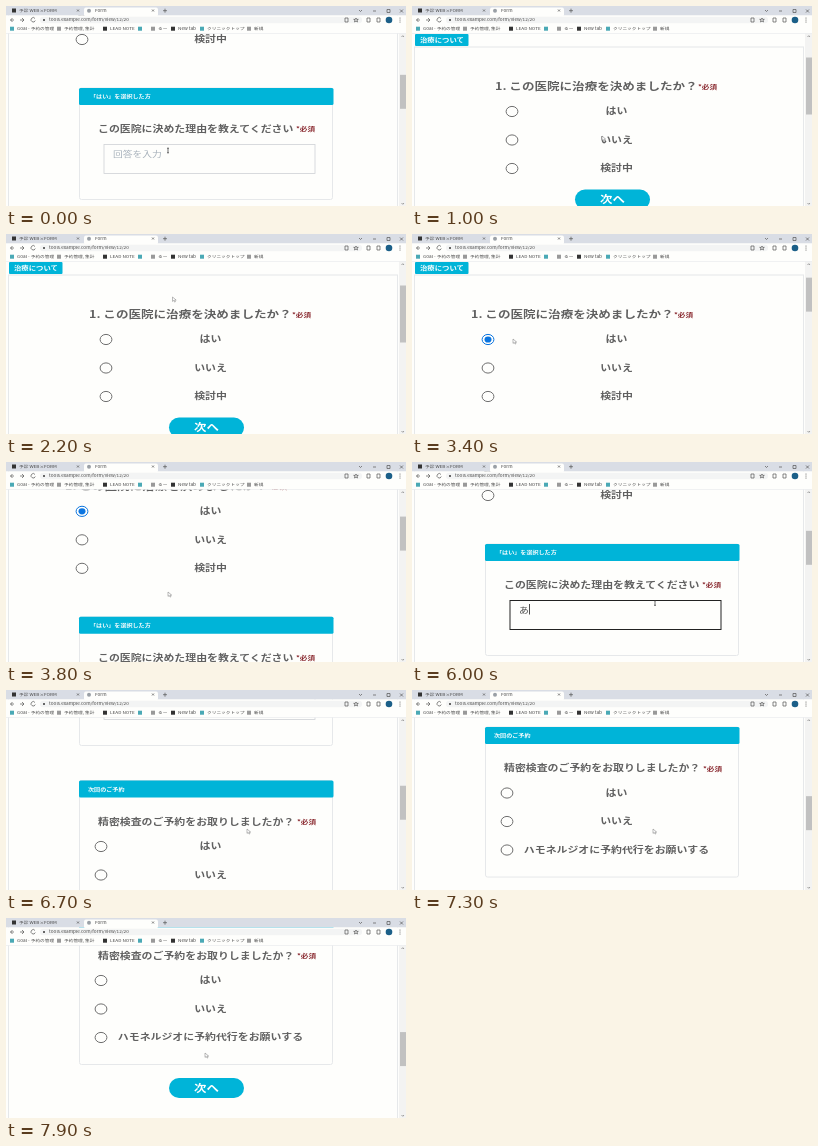
An HTML page that plays this animation: 400 by 200 pixels, repeating every 8 s.

```html
<!DOCTYPE html>
<html lang="ja">
<head>
<meta charset="utf-8">
<title>アンケート</title>
<style>
html, body { margin: 0; width: 100%; height: 100%; overflow: hidden; background: #fefefc; }
svg { display: block; width: 400px; height: 200px; }
text { font-family: "Noto Sans CJK JP", "Noto Sans CJK", "Noto Sans", sans-serif; white-space: pre; }
</style>
</head>
<body>
<svg id="stage" viewBox="0 0 400 200"></svg>
<script>
const CYAN = '#00b4d8', INK = '#606060', LINE = '#e6e8ea', PAPER = '#fefefc', BLUE = '#0b75e0';
const ASPECT = 1.27;
const ROW = 28.5;    // distance between answers
const $ = id => document.getElementById(id);

// y is the vertical middle of the line
const text = (x, y, size, str, fill = INK, weight = 700, anchor = 'start') =>
  `<text transform="translate(${x} ${y + size * .37}) scale(${ASPECT} 1)" font-size="${size}"
    font-weight="${weight}" fill="${fill}" text-anchor="${anchor}">${str}</text>`;
const rect = (x, y, w, h, fill, extra = '') =>
  `<rect x="${x}" y="${y}" width="${w}" height="${h}" fill="${fill}" ${extra}/>`;
const path = (d, color = '#555', width = .7) =>
  `<path d="${d}" fill="none" stroke="${color}" stroke-width="${width}"/>`;
const dot = (x, y, r, fill) => `<circle cx="${x}" cy="${y}" r="${r}" fill="${fill}"/>`;

const question = (x, y, size, str, end) =>
  text(x, y, size, str) + text(end, y + .7, 6, '*必須', '#8a2a30');
const options = (y, name, labels) => labels.map((s, i) =>
  `<ellipse id="${name}${i}" cx="95" cy="${y + ROW * i}" rx="5.9" ry="5.1" fill="${PAPER}" stroke="#707070"/>` +
  text(204.5, y + ROW * i - .5, 8.6, s, INK, 700, 'middle')).join('');
const button = y =>
  rect(163, y - 10, 75, 20, CYAN, 'rx="10"') + text(200.5, y, 9.8, '次へ', '#fff', 700, 'middle');
const card = (y, h, x, title) =>
  rect(73.5, y, 253, h, PAPER, `stroke="${LINE}" rx="2"`) +
  rect(73, y, 254.5, 17, CYAN, 'rx="1.5"') + text(x, y + 8.5, 4.8, title, '#fff');

const page =
  rect(2.5, 98, 389, 900, PAPER, `stroke="${LINE}"`) +
  rect(3, 85, 53.5, 12, CYAN, 'rx="1"') + text(8, 91, 5.8, '治療について', '#fff') +
  `<g id="heading">${question(83, 137, 9.9, '1. この医院に治療を決めましたか？', 286)}</g>` +
  options(162.5, 'radio', ['はい', 'いいえ', '検討中']) +
  `<ellipse id="pick" cx="76" cy="162.5" rx="3.5" ry="3.1" fill="${BLUE}"/>` +
  `<g id="short">${button(250.5)}</g>` +
  `<g id="long">` +
  card(268, 111.5, 84, '「はい」を選択した方') +
  question(92, 308.5, 8.6, 'この医院に決めた理由を教えてください', 290) +
  rect(98, 324.5, 211, 29, PAPER, 'id="box"') +
  text(107, 334, 7.7, '<tspan id="answer"></tspan>', '#a6b0ba', 400) +
  rect(117, 328, .8, 10.5, '#222', 'id="caret"') +
  card(414.5, 150, 82, '次回のご予約') +
  question(92, 455.5, 8.6, '精密検査のご予約をお取りしましたか？', 291) +
  options(480.5, 'visit', ['はい', 'いいえ', 'ハモネルジオに予約代行をお願いする']) +
  button(588) + `</g>`;

const bookmarks = {
  4: 'Goal - 予約の管理', 51: '予約管理, 集計', 97: 'LEAD NOTE', 132: '', 145: 'るー',
  165: 'New tab', 194: 'クリニックトップ', 241: '新規'
};
const small = (x, y, s) => text(x, y, 3.7, s, '#444', 400);
const chrome =
  rect(0, 0, 400, 9.5, '#d9dde5') + rect(0, 9.5, 400, 18, PAPER) +
  rect(78, 1.5, 74, 9, PAPER, 'rx="2"') +
  rect(6, 2.5, 4, 4, '#333') + small(13, 4.8, '予診 WEB×FORM') +
  dot(83, 4.8, 2, '#9aa0a6') + small(89, 4.8, 'Form') +
  path('M71 3.5l2 2m0-2l-2 2M146 3.5l2 2m0-2l-2 2M157 4.7h4m-2-2v4') +
  path('M353 4l1.5 1.5L356 4M367 5h3M381 3.5h3v3h-3zM394 3.5l3 3m0-3l-3 3') +
  path('M8 14H4.5l2-2m-2 2l2 2M14 14h4l-2-2m2 2l-2 2M29 12.5a2.2 2.2 0 1 0 .3 2') +
  rect(34, 10.7, 322, 6.6, '#f3f4f4', 'rx="3.3"') +
  rect(37, 13, 2, 2, '#666') + small(43, 14, 'tools.example.com/form/view/12/20') +
  path('M339 12h3v4h-3zM350 12l.7 1.4h1.6l-1.3 1 .5 1.6-1.5-1-1.5 1 .5-1.6-1.3-1h1.6zM361 12h3v4h-3zM371 12h3v4h-3z') +
  dot(383, 14, 3.3, '#1b5f88') + [12, 14, 16].map(y => dot(394, y, .5, '#444')).join('') +
  Object.entries(bookmarks).map(([x, s], i) =>
    rect(x, 20.7, 4, 4, ['#4aa9b5', '#999', '#333'][i % 3]) + small(+x + 7, 22.5, s)).join('') +
  rect(0, 27, 400, .5, '#e2e4e8');

$('stage').innerHTML =
  `<g id="page">${page}</g>` +
  rect(393, 27, 7, 173, '#f3f3f2') + path('M395.5 31l1.3-1.3L398 31M395.5 197l1.3 1.3L398 197', '#777') +
  rect(394, 0, 6, 34, '#c1c1c1', 'id="thumb"') + chrome +
  `<path id="arrow" d="M0 0v4.4l1.2-1 .9 1.7.8-.4-.8-1.6h1.6z" fill="#fff" stroke="#777" stroke-width=".5"/>` +
  `<g id="beam">${path('M-1 -2.3h2M0 -2.3v4.6M-1 2.3h2', '#333')}</g>`;

// each move is [begin, end, ...values]; values rest between moves
function follow(t, from, moves) {
  return moves.reduce((pos, [begin, end, ...to]) => {
    const p = Math.min(1, Math.max(0, (t - begin) / (end - begin))) ** 1.2;
    return pos.map((v, i) => v + (to[i] - v) * p);
  }, from);
}
const scrolls = [[100, 200, 57], [3400, 4200, 186], [6000, 6700, 324], [6800, 7600, 418]];
const moves = [
  [100, 200, 190, 130], [1300, 2200, 166.5, 63], [2800, 3200, 101, 105], [3400, 3800, 162, 130],
  [3800, 4200, 162, 144.5], [5000, 5200, 243, 141], [6000, 6700, 241, 139], [7300, 7900, 199, 135]
];

const show = (id, on) => $(id).setAttribute('visibility', on ? 'visible' : 'hidden');
const set = (id, attrs) => { for (const k in attrs) $(id).setAttribute(k, attrs[k]); };

function draw(now) {
  const t = Math.floor(now % 8000 / 100) * 100;
  const [s] = follow(t, [186], scrolls), [x, y] = follow(t, [162, 144.5], moves);
  const picked = t < 200 || t >= 3400;
  const focus = t >= 5000 && t <= 6000, typed = t >= 5500;
  const over = t < 200 || (t >= 4200 && t <= 6000);
  const height = picked ? 830 : 486;

  set('page', { transform: `translate(0 ${-s})` });
  set('thumb', { y: 32.5 + s / height * 162, height: picked ? 34 : 57 });
  set('heading', { transform: `translate(${picked ? -24 : 0} 0)` });
  for (let i = 0; i < 3; i++) set('radio' + i, { cx: picked ? 76 : 100 });
  set('radio0', { stroke: picked ? BLUE : '#707070' });
  show('pick', picked);
  show('long', picked);
  show('short', !picked);

  set('box', { stroke: focus ? '#222' : '#d0d3d6', 'stroke-width': focus ? 1 : .8 });
  $('answer').textContent = typed ? 'あ' : focus ? '' : '回答を入力';
  set('answer', { fill: typed ? '#444' : '#a6b0ba' });
  show('caret', focus && typed && (t < 5700 || t === 6000));

  for (const id of ['arrow', 'beam']) set(id, { transform: `translate(${x} ${y})` });
  show('arrow', !over);
  show('beam', over);
}

const start = performance.now();
(function loop() {
  draw(performance.now() - start);
  requestAnimationFrame(loop);
})();
</script>
</body>
</html>
```
